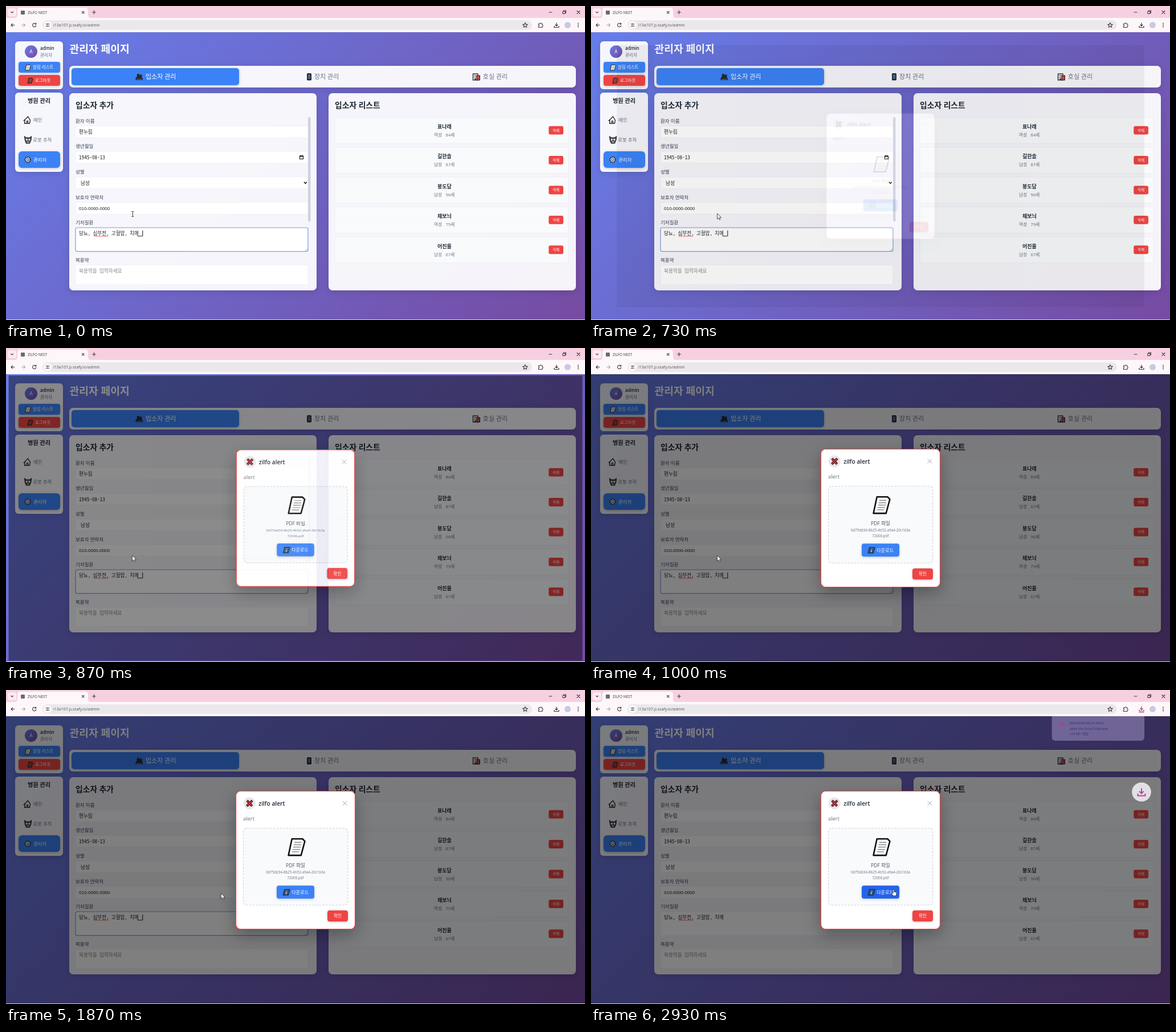
An HTML page that plays this animation: 1016x551 px, repeating every 3 s.

```html
<!DOCTYPE html>
<html lang="ko">
<head>
<meta charset="utf-8">
<title>ZILFO NEST</title>
<style>
  html, body { margin: 0; width: 100%; height: 100%; overflow: hidden; background: #6a74d8; }
  svg { display: block; width: 100vw; height: 100vh; }
  text { font-family: "Open Sans", "Noto Sans CJK KR", "Noto Sans CJK", sans-serif; white-space: pre; }
  .mono { font-family: "Noto Sans Mono CJK KR", "Noto Sans CJK KR", "Noto Sans Mono", monospace; }
  .arial { font-family: "Liberation Sans", Arial, sans-serif; }
  .card { fill: #fff; fill-opacity: .94; filter: drop-shadow(0 3px 6px rgba(0,0,0,.13)); }
  .lift { filter: drop-shadow(0 1px 2px rgba(0,0,0,.22)); }
  .line { fill: none; stroke: #3c3a40; stroke-width: 1.1; stroke-linecap: round; stroke-linejoin: round; }
</style>
</head>
<body>
<svg id="stage" viewBox="0 0 1016 551" preserveAspectRatio="none"></svg>
<script>
const BLUE = '#3b82f6', RED = '#ef4444', INK = '#1f2937', GRAY = '#6b7280';
const LOOP = 3000, TICK = 1000 / 15;

// x, y, right, bottom
const box = (x, y, r, b, rx, fill, extra = '') =>
  `<rect x="${x}" y="${y}" width="${r - x}" height="${b - y}" rx="${rx}" fill="${fill}" ${extra}/>`;
const card = (x, y, r, b, rx = 7) => box(x, y, r, b, rx, '#fff', 'class="card"');
// text placed by the middle of its line
const text = (s, x, mid, size, fill = INK, weight = 400, anchor = 'start', cls = '') =>
  `<text x="${x}" y="${(mid + size * .37).toFixed(2)}" font-size="${size}" fill="${fill}" font-weight="${weight}" text-anchor="${anchor}" class="${cls}">${s}</text>`;
const line = (d, extra = '') => `<path class="line" d="${d}" ${extra}/>`;
const at = (x, y, k, body) => `<g transform="translate(${x} ${y}) scale(${k})">${body}</g>`;

const sheet = (x, y, k, fill = '#fff', ink = '#111') => at(x, y, k,
  `<path d="M-8-14H10L14-10L7.5 14H-14Z" fill="${fill}" stroke="${ink}" stroke-width="2.5" stroke-linejoin="round"/>
   <path d="M-4-8H8M-5-4H8M-6 0H7M-7 4H6M-8 8H4" stroke="#777" stroke-width="1.2"/>`);
const download = (x, y, k, color) => at(x, y, k,
  `<path d="M0-5V2M-3-1L0 2L3-1M-5 2V5H5V2" fill="none" stroke="${color}" stroke-width="1.5"/>`);

function chrome() {
  const dark = 'stroke="#333"';
  return `
    <rect width="1016" height="22" fill="#f6d0e1"/>
    <rect y="21" width="1016" height="25" fill="#fef7fa"/>
    <path d="M15 21Q20 21 20 16V8Q20 3 25 3H139Q144 3 144 8V16Q144 21 149 21Z" fill="#fef7fa"/>
    ${box(3, 4, 18, 18, 4, '#fdeaf2')}
    ${line('M8.7 10.2L10.7 12.2L12.7 10.2', dark)}
    ${box(26, 8, 33, 15, 1, '#6b6b70')}
    ${text('ZILFO NEST', 38, 11.3, 6.4, '#333')}
    ${line('M133.5 9.5L137 13M137 9.5L133.5 13', dark)}
    ${line('M151.5 11H157.5M154.5 8V14', dark)}
    ${line('M953 11H958', dark)}
    ${line('M977 9.5H981V13.5H977ZM978.5 9.5V8H982.5V12H981', 'stroke-width=".9"')}
    ${line('M1002 8.5L1007 13.5M1007 8.5L1002 13.5', dark)}
    ${line('M15 33.5H9M11.5 31L9 33.5L11.5 36', dark)}
    ${line('M27.5 33.5H33.5M31 31L33.5 33.5L31 36', 'stroke="#aaa" style="stroke:#aaa"')}
    ${line('M52.2 31.4A3.2 3.2 0 1 0 52.8 34.5M52.8 30V32H50.6')}
    ${box(64, 25, 923, 42, 8.5, '#ebe8eb')}
    <circle cx="73" cy="33.5" r="6.6" fill="#fff"/>
    ${line('M70 31.7H72M74.5 31.7H76M70 35.3H71.5M74 35.3H76', 'stroke-width=".9"')}
    <circle cx="73.2" cy="31.7" r="1" fill="none" stroke="#333" stroke-width=".8"/>
    <circle cx="72.6" cy="35.3" r="1" fill="none" stroke="#333" stroke-width=".8"/>
    ${text('i13a107.p.ssafy.io/admin', 83, 33.4, 7.05, '#55535a')}
    ${line('M911 29.3L912.2 32.2L915.3 32.4L912.9 34.4L913.7 37.4L911 35.8L908.3 37.4L909.1 34.4L906.7 32.4L909.8 32.2Z', 'stroke-width=".9"')}
    ${line('M934.5 31H937A1 1 0 0 1 939.5 31H941V33A1 1 0 0 1 941 35.5V37.5H934.5V35.2A1 1 0 0 0 934.5 33Z')}
    <g id="tray">${download(966, 33.5, .8, '#333')}</g>
    <g id="trayBusy">${download(966, 33, .8, '#8c3f68')}${line('M962 39.2H970', 'style="stroke:#8c3f68"')}</g>
    <circle cx="985.5" cy="33.5" r="5.5" fill="#c6cae2"/>
    ${[30.5, 33.5, 36.5].map(y => `<circle cx="1004" cy="${y}" r=".9" fill="#333"/>`).join('')}`;
}

function sidebar() {
  return `
    ${card(16, 62, 100, 146, 6)}
    <circle cx="44" cy="80" r="11" fill="url(#face)"/>
    ${text('A', 44, 80, 8.4, '#fff', 400, 'middle')}
    ${text('admin', 60, 74.3, 8, INK, 600)}
    ${text('관리자', 60, 86.5, 7.6, GRAY)}
    ${box(22, 98, 95, 117, 4, BLUE, 'class="lift"')}
    ${sheet(38.5, 108, .34, '#f4ecd0')}
    ${text('알림 리스트', 47, 107.4, 7.5, '#fff', 500)}
    ${box(22, 121, 95, 140, 4, RED, 'class="lift"')}
    ${sheet(42.5, 131, .32, '#8b3a34')}
    ${text('로그아웃', 51, 130.6, 7.4, '#fff', 500)}
    ${card(16, 152, 100, 291, 6)}
    ${text('병원 관리', 58, 166, 10.2, INK, 600, 'middle')}
    <path d="M31.5 201L38.5 194L42.5 200.5L41.5 206H32.5L33 201Z" fill="#f4f2f4" stroke="#222" stroke-width="1.3"/>
    <path d="M36 206V201.5H39V206" fill="#b2574c" stroke="#222" stroke-width=".6"/>
    ${text('메인', 48, 199.6, 8.4, GRAY)}
    <path d="M32.5 229L35 231H42L44.5 229L44 235L41.5 241H35.5L33.5 236Z" fill="#55565c" stroke="#222" stroke-width="1.1"/>
    <circle cx="36.4" cy="234.5" r="1.5" fill="#fff"/><circle cx="41" cy="234.5" r="1.5" fill="#fff"/>
    <path d="M36.5 238.7H40.8" stroke="#ddd" stroke-width="1.1"/>
    ${text('로봇 추적', 47.3, 234.5, 8.4, GRAY)}
    ${box(22, 255, 95, 284, 6, BLUE, 'class="lift"')}
    <circle cx="38" cy="269.7" r="4.6" fill="#e9edf2" stroke="#26303c" stroke-width="2" stroke-dasharray="2.2 .7"/>
    <circle cx="38" cy="269.7" r="1.9" fill="none" stroke="#26303c" stroke-width="1"/>
    ${text('관리자', 48, 269.5, 8.4, '#fff', 500)}`;
}

function tabs() {
  return `
    ${text('관리자 페이지', 111.5, 75.5, 18.2, '#fff', 700)}
    ${card(111, 105, 1000, 143)}
    ${box(115, 109, 409, 139, 5, BLUE, 'class="lift"')}
    <path d="M227.5 130Q227 125 230 124Q228.5 119 232 119Q235 119 234 122Q235 120 237 120Q240 121 238 125Q240.5 126 240 130Z" fill="#25282e"/>
    <path d="M229 128.5H239" stroke="#7c5a50" stroke-width="1.3"/>
    ${text('입소자 관리', 245, 124, 11, '#fff', 500)}
    ${box(528, 118, 536, 130.5, 1.5, '#22262e')}${box(529.6, 120, 534.4, 128, 0, '#4d6483')}
    ${text('장치 관리', 541, 124, 11, GRAY, 400)}
    ${box(819.5, 119, 828, 130, 0, '#f1f1f3', 'stroke="#222" stroke-width="1.3"')}
    ${box(826, 122, 831.5, 130, 0, '#c9474a', 'stroke="#222"')}
    <path d="M821.5 122H826M821.5 125H825" stroke="#c9474a" stroke-width="1.3"/>${box(822, 127, 825, 130, 0, '#33446b')}
    ${text('호실 관리', 836.8, 124, 11, GRAY, 400)}`;
}

function form() {
  const labels = [['환자 이름', 201.5], ['생년월일', 245.5], ['성별', 290.5],
    ['보호자 연락처', 335.5], ['기저질환', 379.5], ['복용약', 445.5]];
  const field = (y, b) => box(122, y, 530, b, 3, '#fff', 'stroke="#eeeff5" stroke-width=".8"');
  return `
    ${card(111, 153, 545, 499)}
    ${text('입소자 추가', 122, 174.3, 13.8, INK, 700)}
    ${labels.map(([s, y]) => text(s, 122, y, 8.5, '#374151', 500)).join('')}
    ${[210.5, 255, 300, 344.7].map(y => field(y, y + 20.7)).join('')}
    ${text('편누림', 128, 221, 8.6, '#222', 400, 'start', 'mono')}
    ${text('1945-08-13', 128, 265.5, 9.2, '#222', 400, 'start', 'mono')}
    ${line('M515.5 263H521.5V268.5H515.5ZM515.5 264H521.5M517 262V263M520 262V263', 'style="stroke:#111"')}
    ${text('남성', 131, 310.5, 8.6, '#222')}
    ${line('M523.3 309.2L525.4 311.4L527.5 309.2', 'style="stroke:#111;stroke-width:1.4"')}
    ${text('010-0000-0000', 128, 355, 8, '#222', 400, 'start', 'arial')}
    ${field(389, 431)}
    ${box(122, 389, 530, 430.7, 3, 'none', 'id="focus" stroke="#7f9fe6" stroke-width="1.2"')}
    ${text('당뇨, 심부전, 고혈압, 치매', 128, 399, 8.6, '#222', 400, 'start', 'mono')}
    <path d="M154 403.5${'l1.25 1l1.25-1'.repeat(10)}" fill="none" stroke="#e04848" stroke-width=".9"/>
    <path id="compose" d="M230.8 403.8H239.3" stroke="#222" stroke-width="1"/>
    <path id="caret" d="M239.8 394V404" stroke="#111" stroke-width="1"/>
    <path d="M525 429.5L528.5 426M527.2 429.5L528.5 428.2" stroke="#888" stroke-width=".7"/>
    <path d="M122 489V457Q122 454.5 125 454.5H527Q530 454.5 530 457V489Z" fill="#fff" stroke="#eeeff5" stroke-width=".8"/>
    ${text('복용약을 입력하세요', 128, 464.7, 8.6, '#858585', 400, 'start', 'mono')}
    ${box(530.2, 195, 534.3, 378.5, 2, '#cbd0dc')}`;
}

function roster() {
  const people = [['표나래', '여성', 84], ['길한솔', '남성', 87], ['봉도담', '남성', 96],
    ['채보늬', '여성', 79], ['어진율', '남성', 67]];
  const row = ([name, sex, age], i) => {
    const y = 195.3 + i * 52.4;
    return box(577, y, 987, y + 46, 4, '#f8fafc', 'stroke="#eceff4" stroke-width=".9"')
      + text(name, 769.3, y + 16.3, 9, INK, 600, 'middle')
      + text(sex, 751, y + 30.8, 7.6, GRAY) + text(age + '세', 771.6, y + 30.8, 7.6, GRAY)
      + box(952.3, y + 15.4, 978, y + 30.3, 3, RED)
      + text('삭제', 965, y + 22.9, 6.6, '#fff', 500, 'middle');
  };
  return card(566, 153, 1000, 499) + text('입소자 리스트', 577, 174.3, 13.8, INK, 700)
    + people.map(row).join('');
}

function modal() {
  return `
    <rect y="46" width="1016" height="505" fill="#000" fill-opacity=".5"/>
    ${box(403.5, 177.5, 612.5, 419.5, 8, '#fff', `stroke="${RED}" stroke-width="1.2" style="filter:drop-shadow(0 10px 14px rgba(0,0,0,.3))"`)}
    <circle cx="427.3" cy="198.8" r="10.6" fill="#e9e6e9"/>
    <path d="M422.5 203.7L432.2 194M423 194L431.7 203.7" stroke="#2a1618" stroke-width="4.2"/>
    <path d="M422.8 203.4L431.9 194.3M423.3 194.3L431.4 203.4" stroke="#c3303a" stroke-width="2.4"/>
    ${text('zilfo alert', 443.3, 199, 10.2, INK, 600)}
    <path d="M590.7 195.2L598 202.5M598 195.2L590.7 202.5" stroke="#9ca3af" stroke-width="1"/>
    ${text('alert', 416, 226, 9.4, GRAY)}
    ${box(416.5, 242.5, 599.8, 377.5, 6, '#f8fafc', 'stroke="#d1d5db" stroke-width="1.2" stroke-dasharray="3.4 2.4"')}
    ${sheet(510, 275.7, 1.03)}
    ${text('PDF 파일', 508, 307.8, 8.6, '#4b5563', 500, 'middle')}
    ${text('0d75dd34-8b25-4b52-a9a4-20c1b3a', 508, 320, 6.2, GRAY, 400, 'middle')}
    ${text('72006.pdf', 508, 329.7, 6.2, GRAY, 400, 'middle')}
    ${box(475, 343.3, 541, 366, 4, BLUE, 'id="save" class="lift"')}
    <path d="M488.8 350H498L495.3 360H486.3Z" fill="#35577f" stroke="#18263c" stroke-width="1.1"/>
    <path d="M492.8 352.4L492.6 353.4M492.2 354.6L491.4 358" stroke="#fff" stroke-width="1.1"/>
    ${text('다운로드', 501.3, 354.9, 8.1, '#fff', 500)}
    ${box(564, 386.8, 600, 406.3, 4, RED, 'class="lift"')}
    ${text('확인', 582, 396.6, 7.7, '#fff', 500, 'middle')}`;
}

function bubble() {
  const tone = '#372b70';
  return `<g id="bubble" clip-path="url(#page)">
      ${box(808.7, 36, 971, 89, 6, '#c4b4e6', 'fill-opacity=".4"')}
      ${box(822, 57.5, 830, 63.5, 1.5, '#a5458f')}
      ${text('0d75dd34-8b25-4b52-', 839.5, 58, 6, tone)}
      ${text('a9a4-20c1b3a72006.pdf', 839.5, 67.3, 6, tone)}
      ${text('123 KB • 완료', 839.5, 76.5, 5.6, tone)}
    </g>
    <g id="puck"><circle r="16.8" fill="#f4eef5"/>${download(0, 0, 1.3, '#b8429a')}</g>`;
}

const stage = document.getElementById('stage');
stage.innerHTML = `
  <defs>
    <linearGradient id="sky" gradientUnits="userSpaceOnUse" x1="127.75" y1="-81.75" x2="888.25" y2="678.75">
      <stop stop-color="#667eea"/><stop offset="1" stop-color="#764ba2"/></linearGradient>
    <linearGradient id="face" x2="1" y2="1"><stop stop-color="#667eea"/><stop offset="1" stop-color="#764ba2"/></linearGradient>
    <clipPath id="page"><rect y="46" width="1016" height="505"/></clipPath>
  </defs>
  <rect y="46" width="1016" height="505" fill="url(#sky)"/>
  ${sidebar()}${tabs()}${form()}${roster()}
  <g id="modal">${modal()}</g>
  ${chrome()}${bubble()}
  <rect y="550" width="1016" height="1" fill="#d8d3e4"/>
  <g id="beam"><path d="M-2-4.5H-.5L0-4L.5-4.5H2M0-4V4M-2 4.5H-.5L0 4L.5 4.5H2" fill="none" stroke="#222" stroke-width=".9"/></g>
  <g id="arrow"><path d="M0 0V9.8L2.3 7.8L3.8 11.2L5.4 10.5L3.9 7.2H7Z" fill="#fff" stroke="#222" stroke-width=".8"/></g>
  <g id="hand"><path d="M-1 .8Q0-.8 1 .8V4.6L4.6 5.6Q5.4 6 5.2 7.4L4.4 11.6H-1L-3.8 7.6Q-3.6 6-2 7L-1 7.8Z" fill="#fff" stroke="#222" stroke-width=".8"/></g>`;

const el = {};
for (const id of ['modal', 'focus', 'compose', 'caret', 'save', 'tray', 'trayBusy', 'bubble', 'puck', 'beam', 'arrow', 'hand'])
  el[id] = document.getElementById(id);

const clamp = v => Math.max(0, Math.min(1, v));
const show = (name, on) => el[name].setAttribute('visibility', on ? 'visible' : 'hidden');
const place = (name, x, y) => el[name].setAttribute('transform', `translate(${x} ${y})`);
const mix = (a, b, k) => Math.round(a + (b - a) * k);

const OPEN = 11, ENTRY = [.11, .36, .91];   // pop-in, by tick
const MOVE = [1530, 2200], FROM = [221.5, 364], TO = [531, 349.5];
const glide = t => {
  const k = clamp((t - MOVE[0]) / (MOVE[1] - MOVE[0]));
  return k * k * (3 - 2 * k);
};

function draw(time) {
  const n = Math.min(44, Math.floor((time + 4) / TICK));
  const t = n * TICK;

  const p = n < OPEN ? 0 : ENTRY[n - OPEN] ?? 1;
  const s = .9 + .1 * p;
  el.modal.setAttribute('opacity', p);
  el.modal.setAttribute('transform', `translate(508 298.5) scale(${s}) translate(-508 -298.5)`);

  const k = glide(t), x = FROM[0] + (TO[0] - FROM[0]) * k, y = FROM[1] + (TO[1] - FROM[1]) * k;
  const over = x > 475;
  show('beam', !p);
  show('arrow', p && !over);
  show('hand', over);
  place('beam', 222.3, 365);
  place('arrow', x, y);
  place('hand', x, y);

  const h = over ? clamp((t - 1930) / 200) : 0;
  el.save.setAttribute('fill', `rgb(${mix(59, 37, h)},${mix(130, 99, h)},${mix(246, 235, h)})`);

  const focused = t < 2590;
  show('focus', focused);
  show('compose', focused);
  show('caret', focused && (n + 7) % 16 < 8);

  const busy = n >= 42;
  show('tray', !busy);
  show('trayBusy', busy);
  show('puck', busy);
  place('puck', 966, 179 + (44 - n) * 22);
  el.puck.setAttribute('opacity', clamp((n - 41) * .29));
  show('bubble', n >= 44);
}

const start = performance.now();
function loop() {
  draw((performance.now() - start) % LOOP);
  requestAnimationFrame(loop);
}
loop();
</script>
</body>
</html>
```
